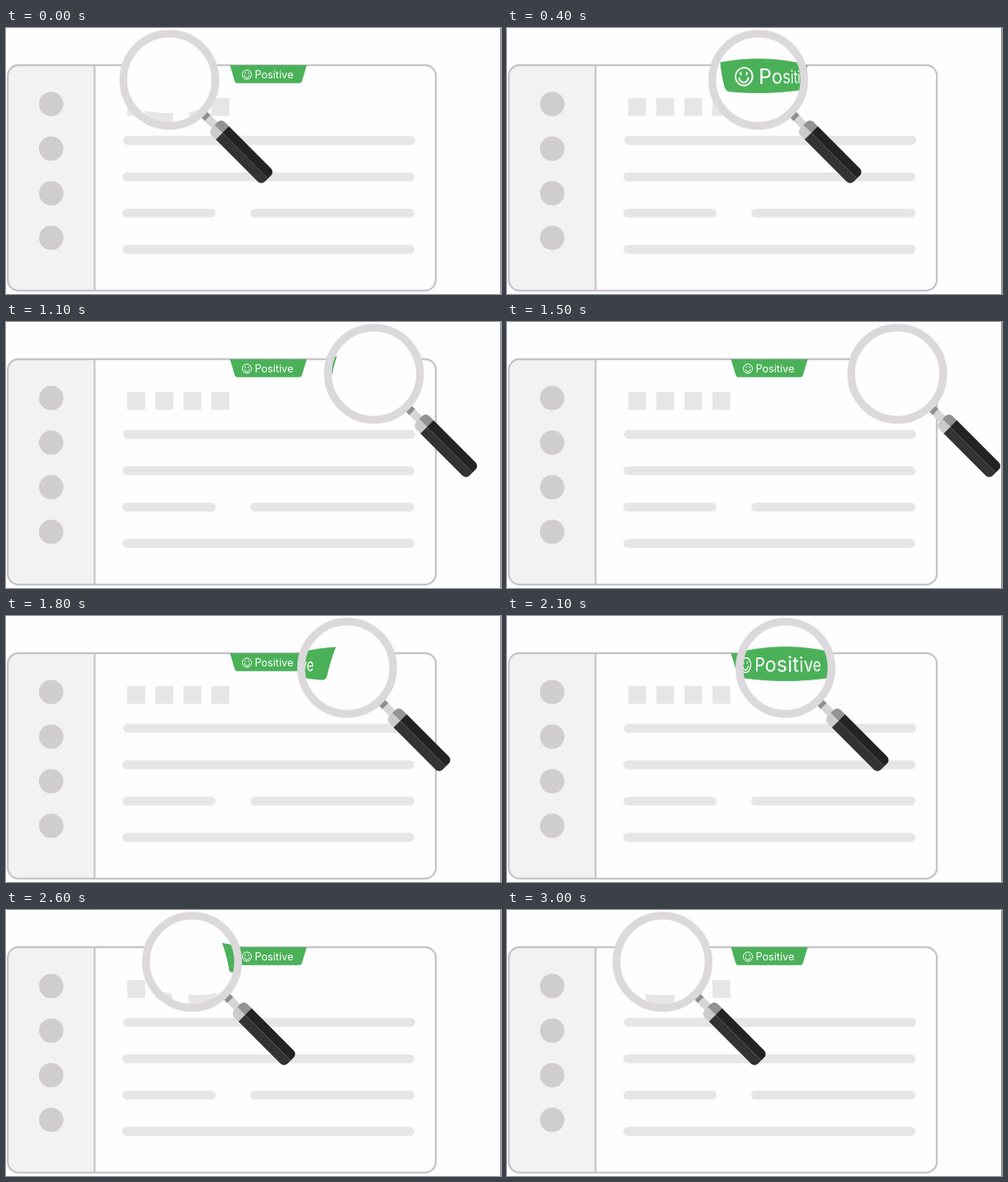
Animation, 600 px wide and 322 px high, one loop 4000 ms. Source, as an HTML page with a canvas:

```html
<!DOCTYPE html>
<html lang="en">
<head>
<meta charset="utf-8">
<title>Magnifier over a card</title>
<style>
html, body { margin: 0; width: 100%; height: 100%; overflow: hidden; background: #fefdff; }
canvas { display: block; }
</style>
</head>
<body>
<canvas id="stage" width="600" height="322"></canvas>
<script>
const W = 600, H = 322, PAPER = '#fefdff', BAR = '#e6e5e8';
const LENS_Y = 62.7, LENS_R = 52, ZOOM = 1.54;
const stage = document.getElementById('stage').getContext('2d');

function layer(scale) {
  const c = document.createElement('canvas');
  c.width = W * scale;
  c.height = H * scale;
  const g = c.getContext('2d');
  g.scale(scale, scale);
  g.fillStyle = PAPER;
  g.fillRect(0, 0, W, H);
  return g;
}

function box(g, x, y, w, h, r, fill) {
  g.beginPath();
  g.roundRect(x, y, w, h, r);
  g.fillStyle = fill;
  g.fill();
}

function disc(g, x, y, r, fill) {
  g.beginPath();
  g.arc(x, y, r, 0, 7);
  g.fillStyle = fill;
  g.fill();
}

// Green label; the origin is the middle of its top edge
function tab(g, x, y, scale) {
  g.save();
  g.translate(x, y);
  g.scale(scale, scale);
  g.fillStyle = '#4bb159';
  g.beginPath();
  g.moveTo(-46.5, 0);
  g.arcTo(-40, 21.8, 0, 21.8, 4);
  g.arcTo(40, 21.8, 46.5, 0, 4);
  g.lineTo(46.5, 0);
  g.fill();

  g.strokeStyle = g.fillStyle = '#fff';
  g.lineWidth = 1;
  g.lineCap = 'round';
  g.beginPath();
  g.arc(-26, 11.5, 5.6, 0, 7);
  g.moveTo(-28, 9);
  g.lineTo(-28, 10.3);
  g.moveTo(-24, 9);
  g.lineTo(-24, 10.3);
  g.moveTo(-23, 12.5);
  g.arc(-26, 12.2, 3, 0.1, Math.PI - 0.1);
  g.stroke();
  g.font = '12.7px Inter, sans-serif';
  g.fillText('Positive', -16.6, 16);
  g.restore();
}

function drawCard(g) {
  g.save();
  g.beginPath();
  g.roundRect(2.2, 45, 518.8, 272.8, 13);
  g.clip();
  g.fillStyle = '#f2f1f4';
  g.fillRect(0, 40, 107, 282);
  g.fillStyle = '#c6c4c7';
  g.fillRect(106.3, 40, 2.2, 282);
  g.restore();
  g.beginPath();
  g.roundRect(2.2, 45, 518.8, 272.8, 13);
  g.strokeStyle = '#c6c4c7';
  g.lineWidth = 2.3;
  g.stroke();

  for (let i = 0; i < 4; i++) {
    disc(g, 54.8, 92 + 54 * i, 14.8, '#cfcdd0');
    g.fillStyle = BAR;
    g.fillRect(147 + 34 * i, 84.7, 21.6, 21.6);
  }
  const bars = [[142, 130.6, 354], [141, 174.7, 354], [141, 218.7, 113], [296, 218.7, 199], [141, 262.6, 354]];
  for (const [x, y, w] of bars) box(g, x, y, w, 10.8, 5.4, BAR);
  tab(g, 318, 45, 1);
  g.fillStyle = '#858487';
  g.fillRect(599, 0, 1, H);
}

// What is seen through the glass, before the bulge
function drawEnlarged(g) {
  g.fillStyle = BAR;
  for (let i = 0; i < 3; i++) g.fillRect(116.6 + 52.4 * i, 99, 33.2, 33.2);
  tab(g, 330.5, 41.8, ZOOM);
}

function drawHandle(g) {
  g.save();
  g.rotate(Math.PI / 4);
  box(g, 56, -5, 10, 10, 0, '#8f8e91');
  box(g, 65.5, -5, 15, 10, 0, '#d6d5d8');
  g.beginPath();
  g.roundRect(77.5, -11.3, 91.5, 22.6, 6);
  g.clip();
  const halves = [[-12, '#939294', '#242324'], [0, '#cbcacd', '#343234']];
  for (const [y, collar, grip] of halves) {
    box(g, 76, y, 16, 12, 0, collar);
    box(g, 91, y, 80, 12, 0, grip);
  }
  g.restore();
}

// Bulge: concentric discs, magnified more towards the middle
function drawGlass(g, x) {
  for (let r = LENS_R; r > 0; r--) {
    const k = 1.3 - 0.3 * (r / LENS_R) ** 2;
    g.save();
    g.beginPath();
    g.arc(0, 0, r, 0, 7);
    g.clip();
    g.scale(k, k);
    g.drawImage(enlarged, -x, -LENS_Y, W, H);
    g.restore();
  }
  g.beginPath();
  g.arc(0, 0, 55.8, 0, 7);
  g.strokeStyle = '#dbd9dc';
  g.lineWidth = 9.4;
  g.stroke();
}

// Time, lens centre, speed (px per ms)
const path = [
  [0, 198, 0.165], [400, 304.5, 0.252], [600, 352, 0.225], [1100, 446, 0.135],
  [1200, 458, 0.1], [1500, 473, 0], [1800, 413.5, -0.26], [2100, 337.5, -0.25],
  [2400, 264.5, -0.22], [2600, 225.5, -0.17], [3000, 188.5, 0]
];

function lensX(t) {
  const i = path.findIndex(p => p[0] > t);
  if (i < 0) return path[path.length - 1][1];
  const [t0, x0, v0] = path[i - 1], [t1, x1, v1] = path[i];
  const d = t1 - t0, s = (t - t0) / d, e = s * s * (3 - 2 * s);
  return x0 + (x1 - x0) * e + d * s * (1 - s) * (v0 * (1 - s) - v1 * s);
}

const cardLayer = layer(1), enlargedLayer = layer(2);
drawCard(cardLayer);
drawEnlarged(enlargedLayer);
const card = cardLayer.canvas, enlarged = enlargedLayer.canvas;

function draw(now) {
  const t = Math.floor(now % 4000 / 100) * 100;
  const x = lensX(t);
  stage.drawImage(card, 0, 0);
  stage.save();
  stage.translate(x, LENS_Y);
  drawHandle(stage);
  drawGlass(stage, x);
  stage.restore();
}

const start = performance.now();
function tick() {
  draw(performance.now() - start);
  requestAnimationFrame(tick);
}
tick();
</script>
</body>
</html>
```
